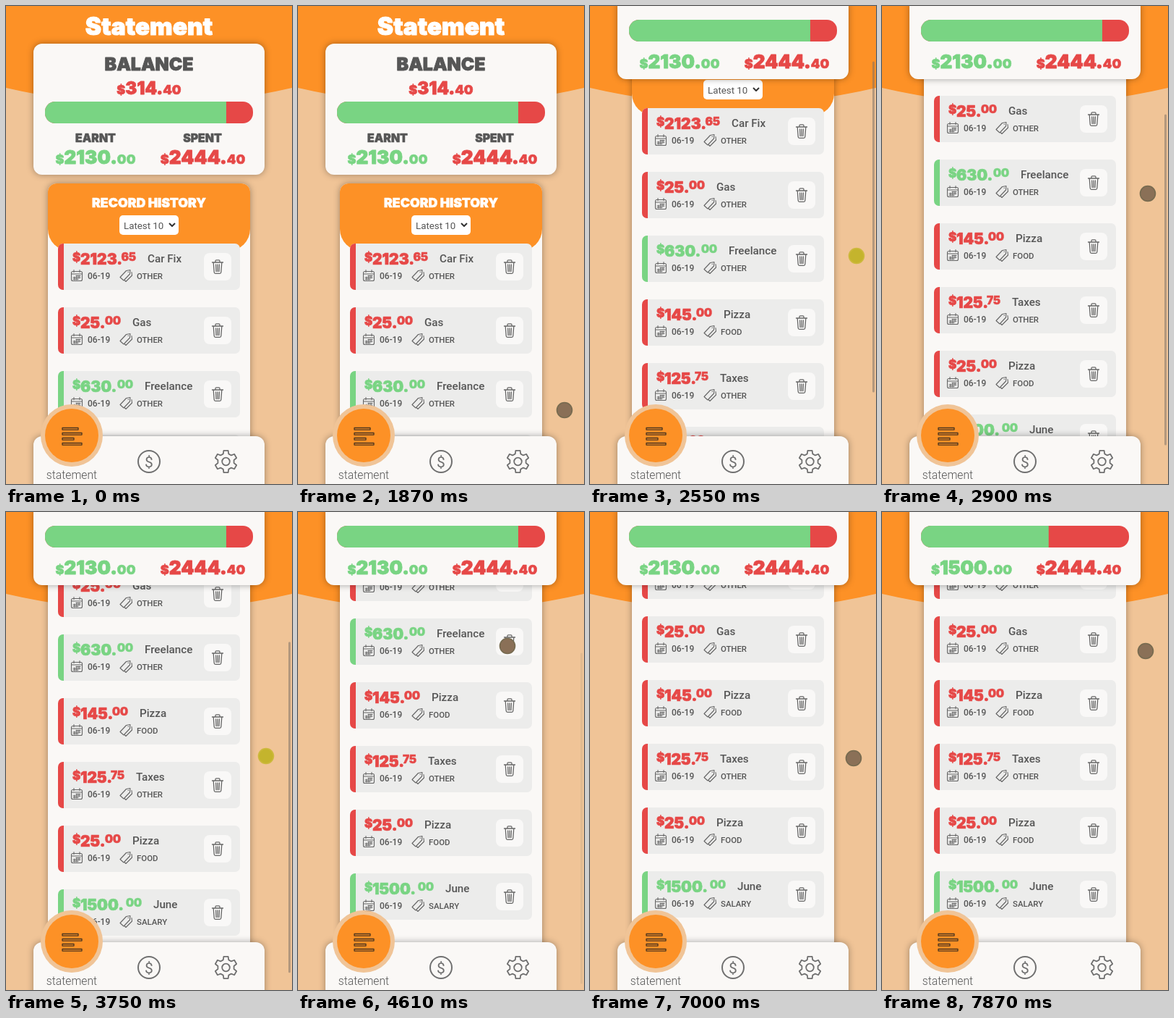
Write an HTML page with a canvas that moves like this. It is 396 by 660 pixels and loops after 8 s.

```html
<!DOCTYPE html>
<html lang="en">
<head>
<meta charset="utf-8">
<title>Statement</title>
<style>
  html, body { margin: 0; width: 100%; height: 100%; overflow: hidden; background: #f0c497; }
  canvas { display: block; width: 396px; height: 660px; }
</style>
</head>
<body>
<canvas id="stage"></canvas>
<script>
const W = 396, H = 660, LOOP = 8000;
const ORANGE = '#fd9126', PEACH = '#f0c497', PAPER = '#faf8f6';
const RED = '#e64847', GREEN = '#79d483', GREY = '#565656';

const canvas = document.getElementById('stage');
const ctx = canvas.getContext('2d');
const ratio = window.devicePixelRatio || 1;
canvas.width = W * ratio;
canvas.height = H * ratio;

// colour, whole part, cents, name, x of the name, category
const records = [
  [RED, '2123.', '65', 'Car Fix', 196, 'OTHER'],
  [RED, '25.', '00', 'Gas', 175, 'OTHER'],
  [GREEN, '630.', '00', 'Freelance', 192, 'OTHER'],
  [RED, '145.', '00', 'Pizza', 185, 'FOOD'],
  [RED, '125.', '75', 'Taxes', 180, 'OTHER'],
  [RED, '25.', '00', 'Pizza', 175, 'FOOD'],
  [GREEN, '1500.', '00', 'June', 204, 'SALARY'],
];
const remaining = records.filter(record => record[3] !== 'Freelance');

// Motion advances in ticks; each key is [tick, ...values]
const FIRST_TICK = 1000, TICK = 171.25;
const DELETED = 35, UPDATED = 38;
const cursorKeys = [
  [0, 4, 640], [5, 369, 558], [7, 369, 545], [8, 369, 440], [9, 369, 345], [10, 369, 280],
  [11, 368, 259], [13, 360, 380], [14, 360, 379], [15, 360, 362], [16, 360, 337], [17, 360, 318],
  [18, 360, 318], [19, 350, 298], [21, 290, 185], [22, 286, 181], [23, 288, 183],
  [25, 352, 268], [26, 361, 315], [27, 365, 340], [37, 365, 340], [38, 365, 310], [40, 365, 192],
];
const scrollKeys = [
  [7, 0], [8, 12], [9, 110], [10, 190], [11, 215], [14, 215], [15, 232], [16, 258], [17, 280],
  [DELETED - 1, 280], [DELETED, 195],
];
const earnedKeys = [[UPDATED - 1, 2130], [UPDATED, 2010], [UPDATED + 1, 1630], [UPDATED + 2, 1500]];
const thumbKeys = [[7, 0], [8, 1], [18, 1], [22, 0]];

function track(keys, tick) {
  const next = keys.findIndex(key => key[0] > tick);
  if (next === 0) return keys[0].slice(1);
  if (next < 0) return keys[keys.length - 1].slice(1);
  const a = keys[next - 1], b = keys[next];
  const k = (tick - a[0]) / (b[0] - a[0]);
  return a.slice(1).map((value, i) => value + (b[i + 1] - value) * k);
}

function box(x, y, w, h, radius, fill, shadow = 0) {
  ctx.save();
  if (shadow) {
    ctx.shadowColor = 'rgba(0,0,0,.35)';
    ctx.shadowBlur = shadow * ratio;
  }
  ctx.beginPath();
  ctx.roundRect(x, y, w, h, radius);
  ctx.fillStyle = fill;
  ctx.fill();
  ctx.restore();
}

function circle(x, y, r, fill, stroke, width = 2) {
  ctx.beginPath();
  ctx.arc(x, y, r, 0, Math.PI * 2);
  if (fill) { ctx.fillStyle = fill; ctx.fill(); }
  if (stroke) { ctx.strokeStyle = stroke; ctx.lineWidth = width; ctx.stroke(); }
}

function plain(text, x, y, size, weight = 500, align = 'left', color = GREY) {
  ctx.font = `${weight} ${size}px Roboto, sans-serif`;
  ctx.textAlign = align;
  ctx.fillStyle = color;
  ctx.fillText(text, x, y);
}

const heavyFont = size => `900 ${size}px Inter, sans-serif`;

function heavy(text, x, y, size, color, align = 'left') {
  ctx.font = heavyFont(size);
  ctx.textAlign = align;
  ctx.fillStyle = ctx.strokeStyle = color;
  ctx.lineWidth = size / 30;
  ctx.lineJoin = 'round';
  ctx.fillText(text, x, y);
  ctx.strokeText(text, x, y);
}

function centredMoney(whole, cents, x, y, size, color) {
  const parts = [['$', 18], [whole, size], [cents, 18]].map(([text, partSize]) => {
    ctx.font = heavyFont(partSize);
    return [text, partSize, ctx.measureText(text).width];
  });
  let left = x - parts.reduce((sum, part) => sum + part[2], 0) / 2;
  for (const [text, partSize, width] of parts) {
    heavy(text, left, y, partSize, color);
    left += width;
  }
}

const icons = {
  calendar: new Path2D('M2.5 2.5h11a2 2 0 0 1 2 2v9a2 2 0 0 1-2 2h-11a2 2 0 0 1-2-2v-9a2 2 0 0 1 2-2z' +
    'M.5 6h15M4 .5v3M12 .5v3M7 8.5h6M3 11h10M3 13.3h7M5 10v4M8 8v6M11 8v4'),
  tag: new Path2D('M1 11.5L9.5 2.5 15 1.5 14.5 7 6 16zM12 4.2h.8M17 4.5L17.5 9 9 17.5 7.5 16'),
  trash: new Path2D('M.5 4h15M5 4V2q0-1.2 1.2-1.2h3.6Q11 .8 11 2v2M2.2 4l1 13.5q.1 1.8 1.8 1.8h6' +
    'q1.7 0 1.8-1.8l1-13.5M5.6 7l.4 9.5M8 7v9.5M10.4 7L10 16.5'),
};

function icon(name, x, y, width = 1.1) {
  ctx.save();
  ctx.translate(x, y);
  ctx.strokeStyle = '#666';
  ctx.lineWidth = width;
  ctx.lineJoin = ctx.lineCap = 'round';
  ctx.stroke(icons[name]);
  ctx.restore();
}

function drawBackground() {
  ctx.fillStyle = PEACH;
  ctx.fillRect(0, 0, W, H);
  ctx.beginPath();
  ctx.moveTo(0, 0);
  ctx.lineTo(0, 113);
  ctx.quadraticCurveTo(W / 2, 159, W, 113);
  ctx.lineTo(W, 0);
  ctx.fillStyle = ORANGE;
  ctx.fill();
}

function drawRecord([color, whole, cents, name, nameX, category], top) {
  box(72, top, 252, 64, 7, '#ececeb');
  box(72, top, 8, 64, [7, 0, 0, 7], color);
  heavy('$', 92, top + 25, 17, color);
  heavy(whole, 103, top + 29, 21, color);
  heavy(cents, nameX - 16, top + 24, 15.5, color, 'right');
  plain(name, nameX, top + 26, 15.2);
  icon('calendar', 90, top + 36);
  plain('06-19', 113, top + 49, 12);
  icon('tag', 157, top + 35);
  plain(category, 181, top + 49, 11.4);
  box(274, top + 13, 38, 38, 8, '#f9f8f7');
  icon('trash', 285, top + 22, 1.3);
}

function drawList(top, list) {
  box(58, top, 280, 1000, 12, PAPER, 10);
  box(58, top, 280, 93, [12, 12, 30, 30], ORANGE);
  heavy('RECORD HISTORY', 198, top + 33, 17.7, '#fff', 'center');
  box(157, top + 44, 82, 27, 5, '#fff');
  plain('Latest 10', 163, top + 63, 13.3, 400);
  ctx.beginPath();
  ctx.moveTo(226, top + 55);
  ctx.lineTo(230, top + 59);
  ctx.lineTo(234, top + 55);
  ctx.strokeStyle = '#333';
  ctx.lineWidth = 2;
  ctx.stroke();
  list.forEach((record, i) => drawRecord(record, top + 83 + i * 88));
}

function drawSummary(top, compact, earned, earnedLabel) {
  const height = compact ? 104 : 181;
  const barTop = top + (compact ? 22 : 80);
  const amountY = top + (compact ? 89 : 166);
  box(38, top, 320, height, compact ? [0, 0, 12, 12] : 12, PAPER, 10);
  if (!compact) {
    heavy('BALANCE', 198, top + 37, 24.8, GREY, 'center');
    centredMoney('314.', '40', 198, top + 70, 24, RED);
    heavy('EARNT', 124, top + 136, 15.8, GREY, 'center');
    heavy('SPENT', 272, top + 136, 15.8, GREY, 'center');
  }
  const greenWidth = 288 * earned / 2444.4;
  box(54, barTop, 288, 30, 14, RED);
  box(54, barTop, greenWidth, 30, [14, 0, 0, 14], GREEN);
  centredMoney(earnedLabel, '00', 124, amountY, 26, GREEN);
  centredMoney('2444.', '40', 272.5, amountY, 26, RED);
}

function drawGear(x, y) {
  const teeth = 6, step = Math.PI * 2 / teeth;
  ctx.beginPath();
  for (let i = 0; i < teeth; i++) {
    for (const [offset, r] of [[-.34, 11.3], [-.2, 15.5], [.2, 15.5], [.34, 11.3]]) {
      const angle = i * step - Math.PI / 2 + offset;
      ctx.lineTo(x + Math.cos(angle) * r, y + Math.sin(angle) * r);
    }
  }
  ctx.closePath();
  ctx.strokeStyle = '#707070';
  ctx.lineWidth = 1.8;
  ctx.lineJoin = 'round';
  ctx.stroke();
  circle(x, y, 5.3, null, '#707070', 1.8);
}

function drawNav() {
  box(38, 594, 320, 90, 12, PAPER, 10);
  circle(91, 593, 43, PEACH);
  circle(91, 593, 37, ORANGE);
  ctx.strokeStyle = '#4b351f';
  ctx.lineWidth = 1.3;
  [22, 27, 16, 27].forEach((width, i) => ctx.strokeRect(78, 582.5 + i * 7, width, 2.6));
  plain('statement', 91, 653, 15.7, 300, 'center', '#555');
  circle(198, 629, 15, null, '#707070');
  plain('$', 198, 636.5, 21, 400, 'center', '#707070');
  drawGear(304.5, 629);
}

function drawCursor(tick) {
  const [x, y] = track(cursorKeys, tick);
  const pressed = (tick >= 7 && tick <= 10) || (tick >= 14 && tick <= 16) || tick === 22;
  circle(x, y, 10.5, pressed ? '#c4b42d' : '#8a7057', pressed ? '#cdb93e' : '#776b50', 1.6);
}

function draw(time) {
  const tick = Math.floor((time - FIRST_TICK) / TICK);
  const [scroll] = track(scrollKeys, tick);
  const [earned] = track(earnedKeys, tick);
  const [thumb] = track(thumbKeys, tick);
  const compact = scroll > 0;

  ctx.setTransform(ratio, 0, 0, ratio, 0, 0);
  drawBackground();
  heavy('Statement', 198, 40 - scroll, 33.5, '#fff', 'center');
  drawList(245 - scroll - (compact ? 77 : 0), tick >= DELETED ? remaining : records);
  drawSummary(Math.max(-3, 52 - scroll), compact, earned, tick >= UPDATED ? '1500.' : '2130.');
  drawNav();
  if (thumb) box(391, scroll * .695, 3, 457, 1.5, `rgba(120,110,100,${.5 * thumb})`);
  if (tick >= 0) drawCursor(tick);
}

const start = performance.now();
function frame() {
  draw((performance.now() - start) % LOOP);
  requestAnimationFrame(frame);
}
frame();
</script>
</body>
</html>
```
